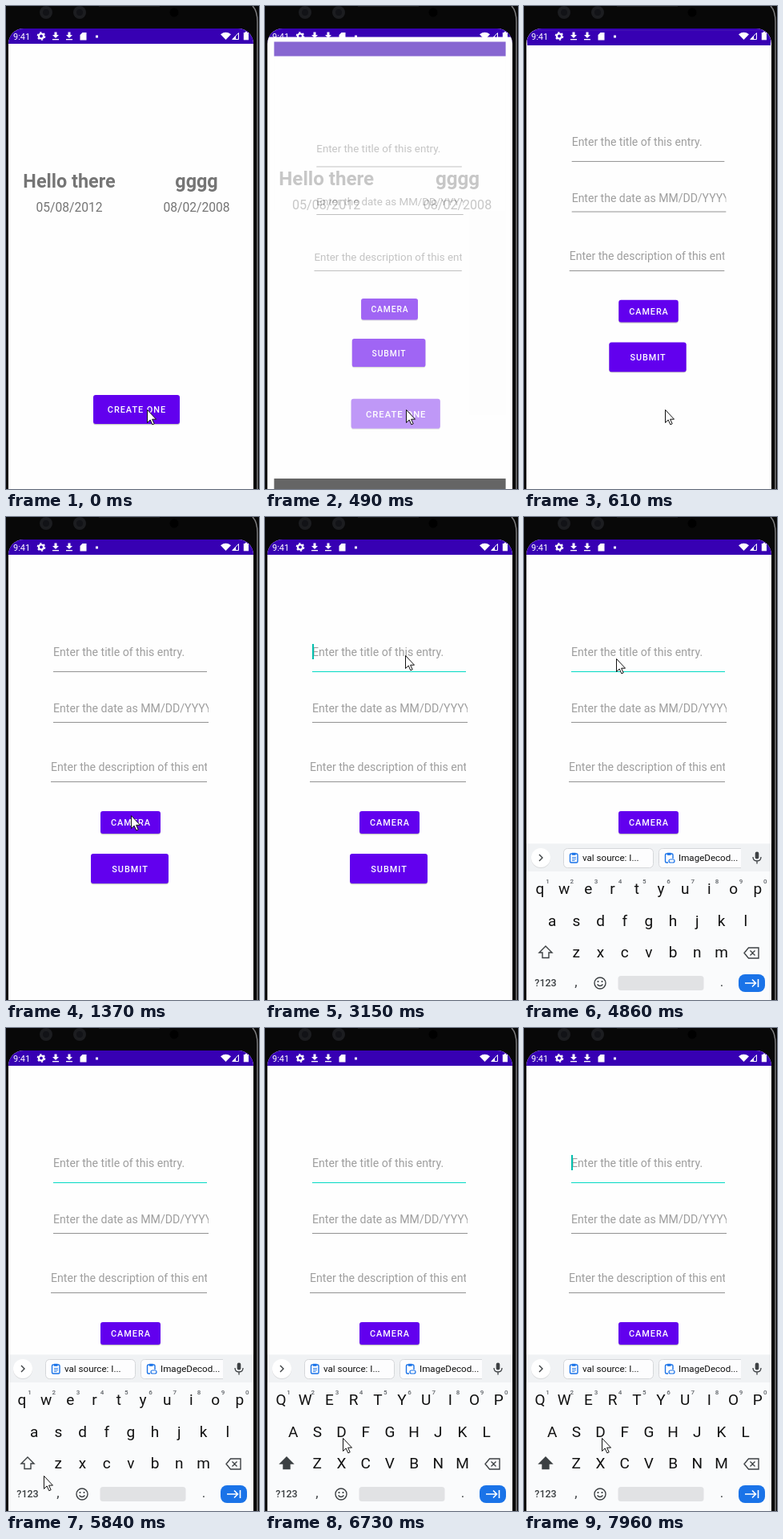
Recreate the animation shown at these times as an HTML page. Size 316 by 601 pixels, loop 8 s.

```html
<!DOCTYPE html>
<html lang="en">
<head>
<meta charset="utf-8">
<style>
  html, body { margin: 0; width: 100%; height: 100%; overflow: hidden; background: #080808; }
  svg { display: block; width: 316px; height: 601px; }
  text { font-family: Roboto, sans-serif; white-space: pre; }
</style>
</head>
<body>
<svg id="stage" viewBox="0 0 316 601"></svg>
<script>
const LOOP = 8000;
const INK = '#3c4043', BLUE = '#1a73e8', PURPLE = '#6200ee', BAR = '#3700b3';
const HINT = '#9e9e9e', GREY = '#757575', TEAL = '#03dac5', RULE = '#939393';
const $ = id => document.getElementById(id);

const rect = (x, y, w, h, fill, more = '') =>
  `<rect x="${x}" y="${y}" width="${w}" height="${h}" fill="${fill}" ${more}/>`;
const text = (x, y, str, size, fill, more = '') =>
  `<text x="${x}" y="${y}" font-size="${size}" fill="${fill}" ${more}>${str}</text>`;
const mid = (x, y, str, size, fill, more = '') =>
  text(x, y, str, size, fill, 'text-anchor="middle" ' + more);
const line = (d, color, width = 1.4, more = '') =>
  `<path d="${d}" fill="none" stroke="${color}" stroke-width="${width}" ${more}/>`;
const shape = (d, fill, more = '') => `<path d="${d}" fill="${fill}" ${more}/>`;
const dot = (x, y, r, fill, more = '') => `<circle cx="${x}" cy="${y}" r="${r}" fill="${fill}" ${more}/>`;
const ring = (x, y, r, color, width, more = '') =>
  dot(x, y, r, 'none', `stroke="${color}" stroke-width="${width}" ${more}`);

// Pages
const button = (x, y, w, h, label, id) =>
  rect(x, y + 1.2, w, h, '#000', 'rx="3" opacity=".22"') +
  rect(x, y, w, h, PURPLE, `rx="3" id="${id}"`) +
  mid(x + w / 2 + .5, y + h / 2 + 4.3, label, 10.9, '#fff', 'font-weight="500" letter-spacing=".97"');

const page = body =>
  rect(3, 28, 306, 580, '#fefefe') + rect(3, 28, 306, 19, BAR) + rect(3, 603, 306, 60, '#000') + body;

const entry = (x, title, date) =>
  mid(x, 226, title, 23.4, GREY, 'font-weight="700"') + mid(x, 255.5, date, 15.6, GREY);

const field = (x, base, right, under, hint, id) =>
  `<svg x="${x}" y="${base - 20}" width="${right - x}" height="30">` +
  text(0, 20, hint, 14.12, HINT, `id="${id}Hint"`) + '</svg>' +
  rect(x, under, right - x, 1, RULE, `id="${id}Line"`);

const listPage = page(
  entry(79, 'Hello there', '05/08/2012') + entry(238, 'gggg', '08/02/2008') +
  button(109, 484, 108, 36, 'CREATE ONE', 'create'));

const formPage = page(
  field(59, 173, 251, 192, 'Enter the title of this entry.', 'title') +
  field(59, 243, 253, 255, 'Enter the date as MM/DD/YYYY', 'date') +
  field(56, 316, 251, 329, 'Enter the description of this entry', 'desc') +
  rect(59, 158, 2, 19, '#03bfae', 'id="caret"') +
  button(118, 366, 75, 28, 'CAMERA', 'camera') + button(106, 419, 97, 37, 'SUBMIT', 'submit'));

// Status bar
const download = x =>
  shape(`M${x - 1.5} 32.5h3v3.5h2.5l-4 4l-4 -4h2.5z`, '#fff') + rect(x - 4, 41, 8, 1.3, '#fff');
const status =
  text(9, 41.5, '9:41', 11, '#fff') +
  ring(44, 37.5, 3, '#fff', 2.2) + ring(44, 37.5, 4.6, '#fff', 1.5, 'stroke-dasharray="2.4 2.4"') +
  download(62) + download(79) +
  shape('M95.5 33h5v9.5h-8v-6.5z', '#fff') + rect(112, 36.5, 3, 3, '#fff') +
  shape('M274.5 42L268 35.2Q274.5 30.5 281 35.2z', '#fff') +
  line('M282.8 41.5L290.5 33.6V41.5z', '#fff', 1) + shape('M282.5 41.8L287 37V41.8z', '#fff') +
  rect(296.8, 33, 6.2, 9.3, '#fff') + rect(298.8, 31.8, 2.2, 2, '#fff');

// Keyboard
const GAP = 30.2;
const across = (chars, x, draw) => [...chars].map((c, i) => draw(c, x + i * GAP)).join('');
const keys = ['qwertyuiop', 'asdfghjkl', 'zxcvbnm'].map((chars, row) =>
  across(chars, 20 + row * GAP / 2 + (row > 1) * GAP / 2, (c, x) =>
    mid(x, 469 + row * 39.5, c, 19, '#111', 'class="key"'))).join('');
const digits = across('1234567890', 29.5, (c, x) => mid(x, 456, c, 8, '#5f6368', 'font-weight="500"'));

const clip = x =>
  rect(x, 419, 9.5, 11, 'none', `rx="1.5" stroke="${BLUE}" stroke-width="1.4"`) +
  rect(x + 2.5, 417.8, 4.5, 3, BLUE);
const label = (x, str) => text(x, 428.3, str, 11.6, '#111');
const chips =
  rect(49.5, 412.5, 112, 24, '#fdfdfe', 'rx="5" stroke="#d5d7da"') + clip(57.5) +
  line('M60 423.5h5M60 425.5h5M60 427.5h3.5', BLUE, .9) + label(73, 'val source: I...') +
  shape('M271 412.5H173.5q-5 0 -5 5v14q0 5 5 5H271', '#fdfdfe', 'stroke="#d5d7da"') + clip(176.5) +
  rect(180, 425, 9, 6, '#fdfdfe') +
  rect(181, 426, 7, 4, 'none', `rx="2" stroke="${BLUE}" stroke-width="1.2"`) + label(193, 'ImageDecod...');

const keyboard =
  rect(3, 406.5, 306, 36, '#f0f2f4') + rect(3, 441, 306, 190, '#fafbfc') +
  dot(21, 425, 12, '#000', 'opacity=".1"') + dot(21, 424, 12, '#fff') + line('M19 420l4 4l-4 4', INK) +
  `<g id="chips">${chips}</g>` +
  rect(288.7, 416.5, 4.6, 9, INK, 'rx="2.3"') + line('M286 423q0 5 5 5t5 -5M291 428v3.5', INK, 1.3) +
  keys + digits +
  line('M27 534l8 8h-4v6.5h-8v-6.5h-4z', INK, 1.4, 'id="shift"') +
  line('M280.5 536h12.5v13h-12.5l-5.5 -6.5zM282.5 539.5l6 6M288.5 539.5l-6 6', INK) +
  mid(27, 584.3, '?123', 12.5, INK, 'font-weight="500"') +
  mid(65, 584, ',', 17, INK) + mid(247, 584, '.', 17, INK) +
  ring(95, 580, 7, INK, 1.4) + dot(92.5, 578, 1.1, INK) + dot(97.5, 578, 1.1, INK) +
  line('M91.5 581.5q3.5 4 7 0', INK, 1.3) +
  rect(117.5, 571, 107, 18, '#e1e2e4', 'rx="3.5"') +
  rect(268, 569, 33, 22, BLUE, 'rx="8"') +
  line('M276 580h13M285 575.5l4.5 4.5l-4.5 4.5M292.5 575v10', '#fff', 1.6);

const lens = x => dot(x, 8, 8, '#1c1d20') + dot(x, 8, 4, '#121317');

$('stage').innerHTML =
  '<clipPath id="screen"><path d="M3 601V47A19 19 0 0 1 22 28H290A19 19 0 0 1 309 47V601z"/></clipPath>' +
  rect(0, 0, 316, 601, '#080808') +
  rect(116, -1, 76, 2, '#1c1c1c') + lens(50) + lens(92) + dot(210, 8, 5.5, '#000') +
  line('M308 0Q314 6 314 20V601', '#7c7c7e', 1.5) +
  `<g clip-path="url(#screen)">
    ${rect(3, 28, 306, 573, BAR)}
    <g id="list">${listPage}</g>
    <g id="form">${formPage}</g>
    ${status}
    <g id="keyboard">${keyboard}</g>
  </g>
  <path id="pointer" d="M.5 .5V16.5L4.2 13L6.8 18.8L9.2 17.8L6.6 12.2H11.5z" fill="#fff" stroke="#111"/>`;

// Turning points of the pointer: time, x, y
const route = [
  [860, 176, 502], [1220, 157, 434], [1370, 156, 372], [1490, 154, 269], [1880, 175, 172],
  [3650, 175, 172], [4130, 115, 176], [5000, 115, 176], [5360, 168, 300], [5840, 47, 557],
  [6080, 34, 538], [6340, 34, 538], [6730, 97, 510]];

function pointerAt(t) {
  const next = route.findIndex(p => p[0] > t);
  if (next < 1) return (next ? route[route.length - 1] : route[0]).slice(1);
  const [t0, x0, y0] = route[next - 1], [t1, x1, y1] = route[next];
  const p = (t - t0) / (t1 - t0);
  return [x0 + (x1 - x0) * p, y0 + (y1 - y0) * p];
}

const set = (id, name, value) => $(id).setAttribute(name, value);
const show = (id, on) => set(id, 'visibility', on ? 'inherit' : 'hidden');
const zoom = s => `translate(156 329) scale(${s}) translate(-156 -329)`;
const within = (t, from, to) => t >= from && t < to;
// Progress 0..1 that advances once per 120 ms
const stepped = (t, from, count) => Math.min(1, Math.max(0, Math.floor((t - from) / 120) / count));
const keyNodes = [...document.querySelectorAll('.key')];

function draw(t) {
  set('pointer', 'transform', `translate(${pointerAt(t)})`);

  const open = stepped(t, 370, 3);
  set('list', 'transform', zoom(1 + .09 * open));
  set('form', 'transform', zoom(1 - .185 * (1 - open) ** 3));
  set('form', 'opacity', Math.min(1, 1.8 * open));
  show('list', open < 1);
  set('create', 'fill', within(t, 370, 490) ? '#7726f0' : PURPLE);

  const focused = t >= 2000;
  const pressed = within(t, 2000, 2250) || within(t, 4500, 4740);
  set('titleHint', 'fill', pressed ? '#6f6f6f' : HINT);
  set('titleLine', 'fill', focused ? TEAL : RULE);
  show('caret', focused && (t < 2655 || Math.floor((t - 2655) / 482) % 2));

  const rise = stepped(t, 4500, 2);
  show('keyboard', t >= 4500);
  set('keyboard', 'transform', `translate(0 ${23 * (1 - rise) ** 2})`);
  set('keyboard', 'opacity', Math.min(1, .7 + .6 * rise));
  show('chips', t >= 4860);

  const caps = t >= 6330;
  set('shift', 'fill', caps ? INK : 'none');
  for (const key of keyNodes) {
    const letter = key.textContent.toLowerCase();
    key.textContent = caps ? letter.toUpperCase() : letter;
  }
}

const start = performance.now();
function tick() {
  draw((performance.now() - start) % LOOP);
  requestAnimationFrame(tick);
}
tick();
</script>
</body>
</html>
```
